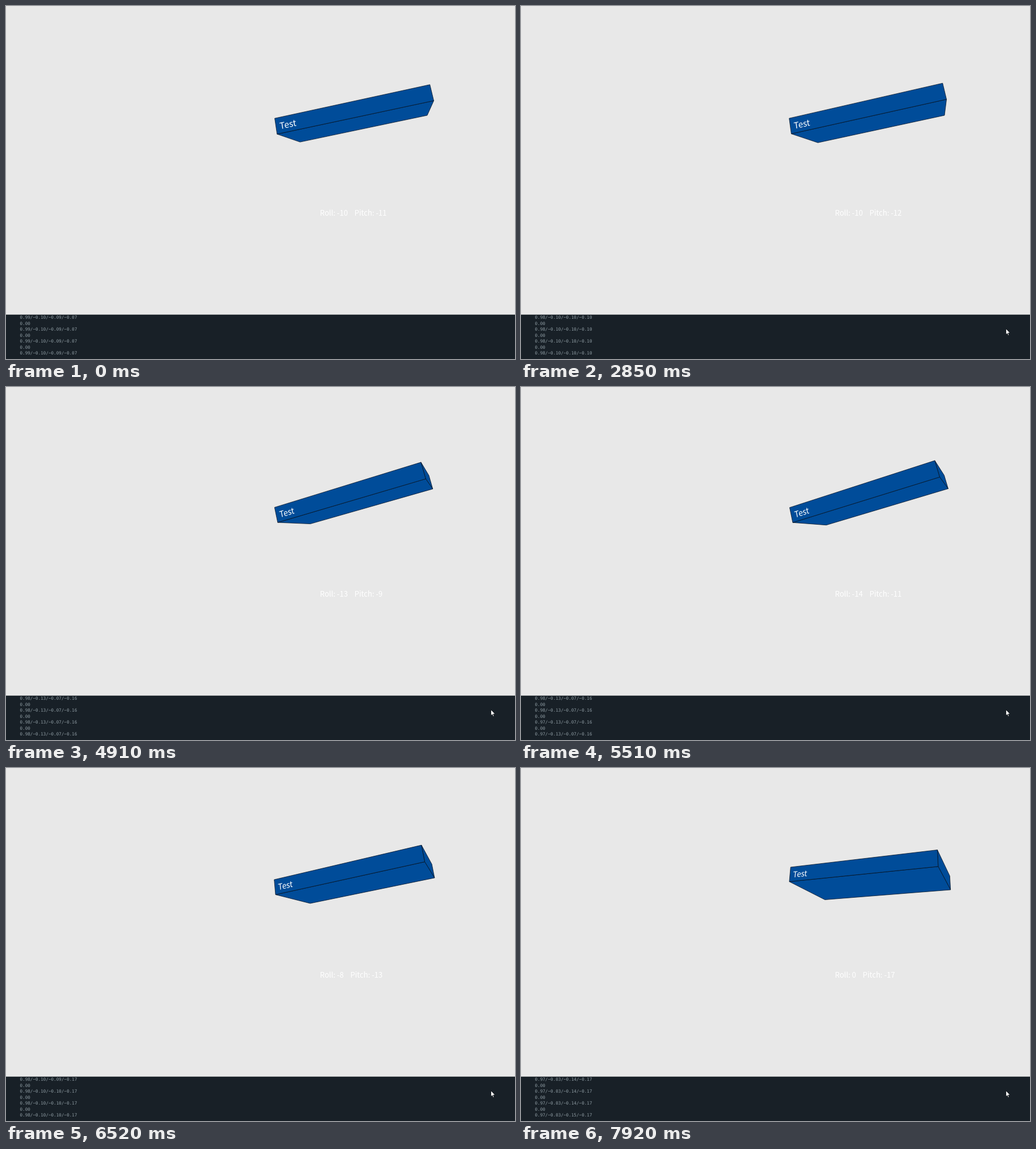
An HTML page with a canvas for the animation above (7990 ms loop, 899 px wide and 623 px high).

```html
<!DOCTYPE html>
<html lang="en">
<head>
<meta charset="utf-8">
<title>Orientation viewer</title>
<style>
html, body { margin: 0; width: 100%; height: 100%; overflow: hidden; background: #e8e8e8; }
canvas { display: block; }
</style>
</head>
<body>
<canvas id="stage" width="899" height="623"></canvas>
<script>
const ctx = document.getElementById('stage').getContext('2d');
const LOOP = 7990, STEP = 110, LAG = 200;
const SANS = '"Noto Sans CJK JP", "Noto Sans CJK SC", "Noto Sans", sans-serif';
const CENTER = { x: 620.5, y: 195.4 }, SCALE = .656, CAMERA = 935;
const BOX = { x: 193, y: 20, z: 100 }; // half sizes

// Key orientations in degrees
const keys = [
  { t: 0, roll: -10.9, pitch: -11.1, yaw: -7 },
  { t: 440, roll: -10.9, pitch: -11.1, yaw: -7 },
  { t: 580, roll: -10.95, pitch: -11.4, yaw: -8 },
  { t: 1639, roll: -10.95, pitch: -11.4, yaw: -8 },
  { t: 1640, roll: -9.6, pitch: -11.4, yaw: -8.2 },
  { t: 2400, roll: -10.5, pitch: -12.6, yaw: -10.4 },
  { t: 2850, roll: -10.5, pitch: -12.6, yaw: -10.4 },
  { t: 3440, roll: -12.2, pitch: -12.3, yaw: -12.4 },
  { t: 4380, roll: -14.3, pitch: -11.2, yaw: -16.45 },
  { t: 4910, roll: -13.8, pitch: -9.6, yaw: -17.2 },
  { t: 5500, roll: -14, pitch: -11, yaw: -18.2 },
  { t: 6050, roll: -10.8, pitch: -12.1, yaw: -18.4 },
  { t: 7060, roll: -4.5, pitch: -15.5, yaw: -19.2 },
  { t: 7920, roll: .8, pitch: -17.6, yaw: -19.9 }
];

const rad = deg => deg * Math.PI / 180;
const turn = (a, b, angle) => {
  const c = Math.cos(angle), s = Math.sin(angle);
  return [a * c - b * s, a * s + b * c];
};

// With a step, the value holds between redraws counted from each key
function poseAt(t, step = 0) {
  const i = Math.max(0, keys.findLastIndex(k => k.t <= t));
  const a = keys[i], b = keys[i + 1] ?? a;
  let age = Math.max(0, t - a.t);
  if (step) age -= age % step;
  const k = a === b ? 0 : age / (b.t - a.t);
  const mix = name => a[name] + (b[name] - a[name]) * k;
  return { roll: mix('roll'), pitch: mix('pitch'), yaw: mix('yaw') };
}

function quaternion({ roll, pitch, yaw }) {
  const [r, p, y] = [roll, pitch, yaw].map(deg => rad(deg) / 2);
  const cr = Math.cos(r), sr = Math.sin(r);
  const cp = Math.cos(p), sp = Math.sin(p);
  const cy = Math.cos(y), sy = Math.sin(y);
  return [
    cr * cp * cy + sr * sp * sy,
    sr * cp * cy - cr * sp * sy,
    cr * sp * cy + sr * cp * sy,
    cr * cp * sy - sr * sp * cy
  ];
}

function project([x, y, z], { roll, pitch, yaw }) {
  [z, x] = turn(z, x, rad(yaw));
  [x, y] = turn(x, y, rad(roll));
  [y, z] = turn(y, z, rad(-pitch));
  const k = SCALE * CAMERA / (CAMERA - z);
  return [CENTER.x + x * k, CENTER.y + y * k];
}

function polygon(points, fill, stroke, width) {
  ctx.beginPath();
  points.forEach(p => ctx.lineTo(...p));
  ctx.closePath();
  ctx.fillStyle = fill;
  ctx.fill();
  ctx.strokeStyle = stroke;
  ctx.lineWidth = width;
  ctx.lineJoin = 'round';
  ctx.stroke();
}

function drawBox(pose) {
  const at = (x, y, z) => project([x, y, z], pose);
  const corner = (x, y, z) => at(x * BOX.x, y * BOX.y, z * BOX.z);
  const face = (...points) => {
    const [[ax, ay], [bx, by], [cx, cy]] = points;
    if ((bx - ax) * (cy - by) > (by - ay) * (cx - bx)) polygon(points, '#004c99', '#000a14', .7);
  };
  face(corner(1, -1, 1), corner(1, -1, -1), corner(1, 1, -1), corner(1, 1, 1));
  face(corner(-1, 1, 1), corner(1, 1, 1), corner(1, 1, -1), corner(-1, 1, -1));
  face(corner(-1, -1, 1), corner(1, -1, 1), corner(1, 1, 1), corner(-1, 1, 1));

  const [ox, oy] = at(-183, 10, 101), [rx, ry] = at(-143, 10, 101), [ux, uy] = at(-183, -10, 101);
  ctx.save();
  ctx.transform((rx - ox) / 40, (ry - oy) / 40, (ox - ux) / 20, (oy - uy) / 20, ox, oy);
  ctx.font = '22px ' + SANS;
  ctx.fillStyle = '#fff';
  ctx.fillText('Test', 0, 0);
  ctx.restore();
}

function drawConsole(t) {
  ctx.fillStyle = '#182027';
  ctx.fillRect(0, 544.7, 899, 79);
  ctx.font = '7.63px "DejaVu Sans Mono", monospace';
  ctx.fillStyle = '#8e9ba2';
  const shifted = t >= 70 && t < 310 ? 1 : 0;
  for (let row = 0; row < 7; row++) {
    const values = quaternion(poseAt(t - LAG - (6 - row) * 20));
    const line = row % 2 === shifted ? values.map(n => n.toFixed(2)).join('/') : '0.00';
    ctx.fillText(line.replaceAll('-', '\u2212'), 24.5, 552 + row * 10.5);
  }
}

function drawPointer(x, y) {
  const shape = [[0, 0], [0, 10.5], [2.4, 8.3], [4, 12], [5.6, 11.3], [4, 7.7], [7.2, 7.4]];
  polygon(shape.map(([a, b]) => [x + a, y + b]), '#fff', '#0b1014', .8);
}

function frame(now) {
  const t = now % LOOP, pose = poseAt(t, STEP);
  ctx.fillStyle = '#e8e8e8';
  ctx.fillRect(0, 0, 899, 623);
  drawBox(pose);
  ctx.font = '13.1px ' + SANS;
  ctx.fillStyle = '#fff';
  ctx.fillText(`Roll: ${Math.trunc(pose.roll)}    Pitch: ${Math.trunc(pose.pitch)}`, 554.5, 369.7);
  drawConsole(t);
  if (t >= 70) drawPointer(856.5, t < 110 ? 611 : 569.5);
  requestAnimationFrame(frame);
}
requestAnimationFrame(frame);
</script>
</body>
</html>
```
